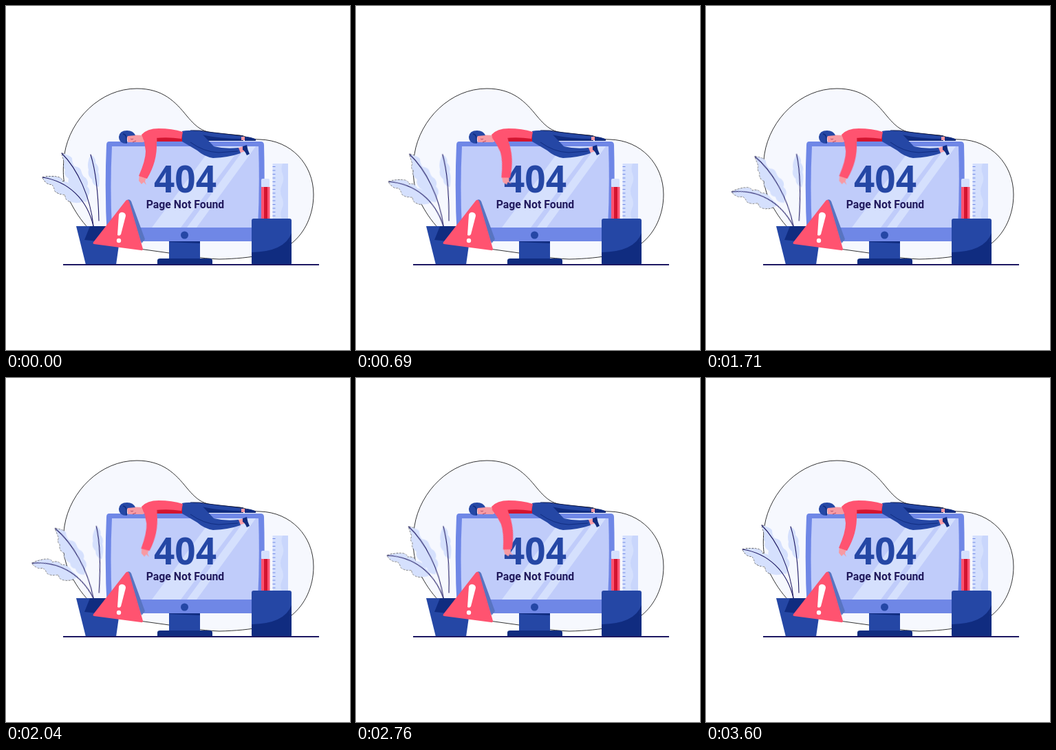
An HTML page without scripts for the animation above (3.66 s loop, 500 by 500 pixels).

```html
<!DOCTYPE html>
<html lang="en">
<head>
<meta charset="utf-8">
<title>Page Not Found</title>
<style>
  html, body { margin: 0; width: 100%; height: 100%; overflow: hidden; background: #fff; }
  svg { display: block; width: 100vw; height: 100vh; }
  .blue { fill: #2547a5; }
  .navy { fill: #102c80; }
  .frame { fill: #6f87e6; }
  .pale { fill: #d5e0fd; }
  .red { fill: #ff5370; }
  .crimson { fill: #d3142f; }
  .skin { fill: #f79aa3; }
  .edge { fill: none; stroke: #000; stroke-width: .9; stroke-dasharray: 3 1.5; }
  .rib { fill: none; stroke: #1d1862; stroke-width: 1.1; stroke-linecap: round; }
  text { text-anchor: middle; }

  /* One swing takes 3600 ms, followed by a 60 ms rest. */
  .sway, .arm { animation: sway 3660ms cubic-bezier(.37, 0, .63, 1) infinite; }
  .low { --turn: -14.8deg; transform-origin: 127px 320px; }
  .tall { --turn: -5.5deg; transform-origin: 127px 320px; }
  .slim { --turn: 5deg; transform-origin: 135px 315px; }
  .arm { --turn: -20.5deg; transform-origin: 210px 190px; animation-name: swing; }
  @keyframes sway {
    0%, 98.36%, 100% { transform: rotate(0deg); }
    49.18% { transform: rotate(var(--turn)); }
  }
  @keyframes swing {
    0%, 49.18%, 98.36%, 100% { transform: rotate(0deg); }
    24.59%, 73.77% { transform: rotate(var(--turn)); }
  }
</style>
</head>
<body>
<svg viewBox="0 0 500 500">
  <defs>
    <path id="low" d="M53 249Q65 246 77 249Q82 251 82 255Q91 254 94 262Q103 263 106 273L113 284Q101 289 90 283Q86 281 86 274Q76 274 71 269Q70 262 66 259Q58 260 53 249Z"/>
    <path id="tall" d="M81 214Q93 217 96 221Q96 229 100 233Q109 234 110 242Q111 247 116 250Q121 256 118 262Q124 268 120 275L117 285Q106 284 105 275Q98 274 98 266Q88 260 91 251Q83 246 86 238Q82 234 85 228Z"/>
    <path id="slim" d="M123 216Q131 220 130 228Q136 234 134 241Q137 248 135 263Q125 261 125 252Q118 247 120 238Q117 229 123 216Z"/>
    <clipPath id="screen"><path d="M154 204H367Q369 263 366 322H154Q151 263 154 204Z"/></clipPath>
    <clipPath id="cup"><rect x="357" y="309" width="58" height="67" rx="3"/></clipPath>
  </defs>

  <rect width="500" height="500" fill="#fff"/>

  <!-- Outlines show only outside the backdrop -->
  <g class="edge">
    <use href="#low" class="sway low"/>
    <use href="#tall" class="sway tall"/>
  </g>
  <path d="M85 215C93 165 137 120 190 120C228 120 246 139 263 160C279 179 287 183 306 185L340 188C351 190 357 194 369 194C414 195 447 230 447 274C447 304 434 330 415 345C395 360 357 367 310 368C282 367 257 362 237 359L165 349C130 343 106 310 93 284C82 261 82 239 85 215Z" fill="#f6f8fe" stroke="#000" stroke-width=".8"/>

  <g class="sway slim">
    <use href="#slim" class="pale"/>
    <path class="rib" d="M123 216C131 241 134 270 135 312"/>
  </g>
  <g class="sway tall">
    <use href="#tall" class="pale"/>
    <path class="rib" d="M81 214C104 237 123 278 127 320"/>
  </g>
  <g class="sway low">
    <use href="#low" class="pale"/>
    <path class="rib" d="M53 249C91 255 118 281 127 320"/>
  </g>

  <!-- Monitor -->
  <rect class="blue" x="237" y="338" width="45" height="32"/>
  <path class="navy" d="M237 342H282V345L237 343Z"/>
  <path class="navy" d="M220 376V370Q220 367 224 367H296Q300 367 300 370V376Z"/>
  <path class="frame" d="M150 197H370Q375 197 375 202Q377 270 373 337Q372 342 367 342H153Q148 342 147 337Q143 270 146 202Q146 197 150 197Z"/>
  <g clip-path="url(#screen)">
    <rect x="150" y="203" width="220" height="120" fill="#c0ccfa"/>
    <path class="pale" d="M300 204H342L254 322H212ZM349 204H363L277 322H263Z"/>
  </g>
  <circle class="blue" cx="259.5" cy="333" r="5.5"/>
  <text class="blue" x="260.5" y="271" font-family="Noto Sans, Open Sans, sans-serif" font-weight="700" font-size="53">404</text>
  <text x="260.5" y="294" fill="#211a5c" font-family="Roboto, Open Sans, sans-serif" font-weight="700" font-size="15.8">Page Not Found</text>

  <!-- Person -->
  <path class="blue" d="M256 182Q275 179 294 183L345 189V195H287Z"/>
  <path class="navy" d="M284 187Q312 193 345 193V196H292Z"/>
  <path d="M268 181Q281 180 294 183L345 189" fill="none" stroke="#0b1440" stroke-width=".9"/>
  <path class="skin" d="M342 190H350V195H342Z"/>
  <path class="navy" d="M347 190Q357 190 363 194V196H347Z"/>
  <path class="skin" d="M335 207L345 204L348 211L338 214Z"/>
  <path class="navy" d="M344 204L350 202Q351 209 354 215L350 217Q347 210 344 209Z"/>
  <path class="blue" d="M256 182Q274 179 286 187L302 204Q318 208 338 206L341 214Q324 220 301 221Q288 219 278 210L256 197Z"/>
  <path d="M268 198Q287 212 309 213L337 211" fill="none" stroke="#102c80" stroke-width="1"/>
  <path class="crimson" d="M215 188H256V197H217Z"/>
  <path class="skin" d="M176 188Q187 187 200 188V198H177Z"/>
  <path class="blue" d="M164 190Q165 181 176 181Q185 181 188 188L177 189Q174 193 176 200Q164 200 164 190Z"/>
  <path d="M170 186Q176 186 175 199" fill="none" stroke="#102c80" stroke-width="1.5"/>
  <path d="M181 193Q183 195 185 193M184 198L189 196" fill="none" stroke="#a94562" stroke-width=".9"/>
  <path class="red" d="M197 187Q205 178 222 178Q241 178 257 183L255 193Q236 190 217 192L201 197Z"/>
  <g class="arm">
    <path class="skin" d="M194 245L204 249L202 255L204 260L200 256L197 259L193 254Z"/>
    <path class="red" d="M198 187Q203 181 212 182Q221 185 219 199Q220 226 205 251L193 247Q203 224 203 211Q202 199 198 187Z"/>
  </g>

  <!-- Pencil, ruler and cup -->
  <rect class="pale" x="371" y="251" width="12" height="13" rx="2"/>
  <rect class="red" x="371" y="263" width="12.5" height="47"/>
  <rect class="crimson" x="375" y="263" width="5" height="47"/>
  <rect class="pale" x="387.5" y="229" width="22.5" height="82"/>
  <path d="M402 229H410V311H402Q397 303 401 295T401 278T401 260T402 244T402 229Z" fill="#c9d6fc"/>
  <path d="M389.5 233V308" stroke="#6f87e6" stroke-width="4" stroke-dasharray="1 4.5"/>
  <g clip-path="url(#cup)">
    <rect class="blue" x="357" y="309" width="58" height="67"/>
    <path class="navy" d="M415 330Q405 357 357 358V376H415Z"/>
  </g>

  <!-- Pot and warning sign -->
  <path class="blue" d="M102 320H168L160 376H116Z"/>
  <path class="navy" d="M122 320H168L163 345L114 340Z"/>
  <path d="M176 282Q180 280 182 284L202 339L197 345Z" fill="#5874c1"/>
  <path class="red" d="M174 283Q177 280 179 284L199 353Q199 356 196 355L128 346Q125 345 128 342Z"/>
  <g fill="#fff">
    <path d="M164 303Q166 299 170 300Q174 301 174 305L167 332Q165 335 162 333Z"/>
    <circle cx="164" cy="341" r="3.2"/>
  </g>

  <path d="M83 376H455" stroke="#1d1862" stroke-width="1.8"/>
</svg>
</body>
</html>
```
